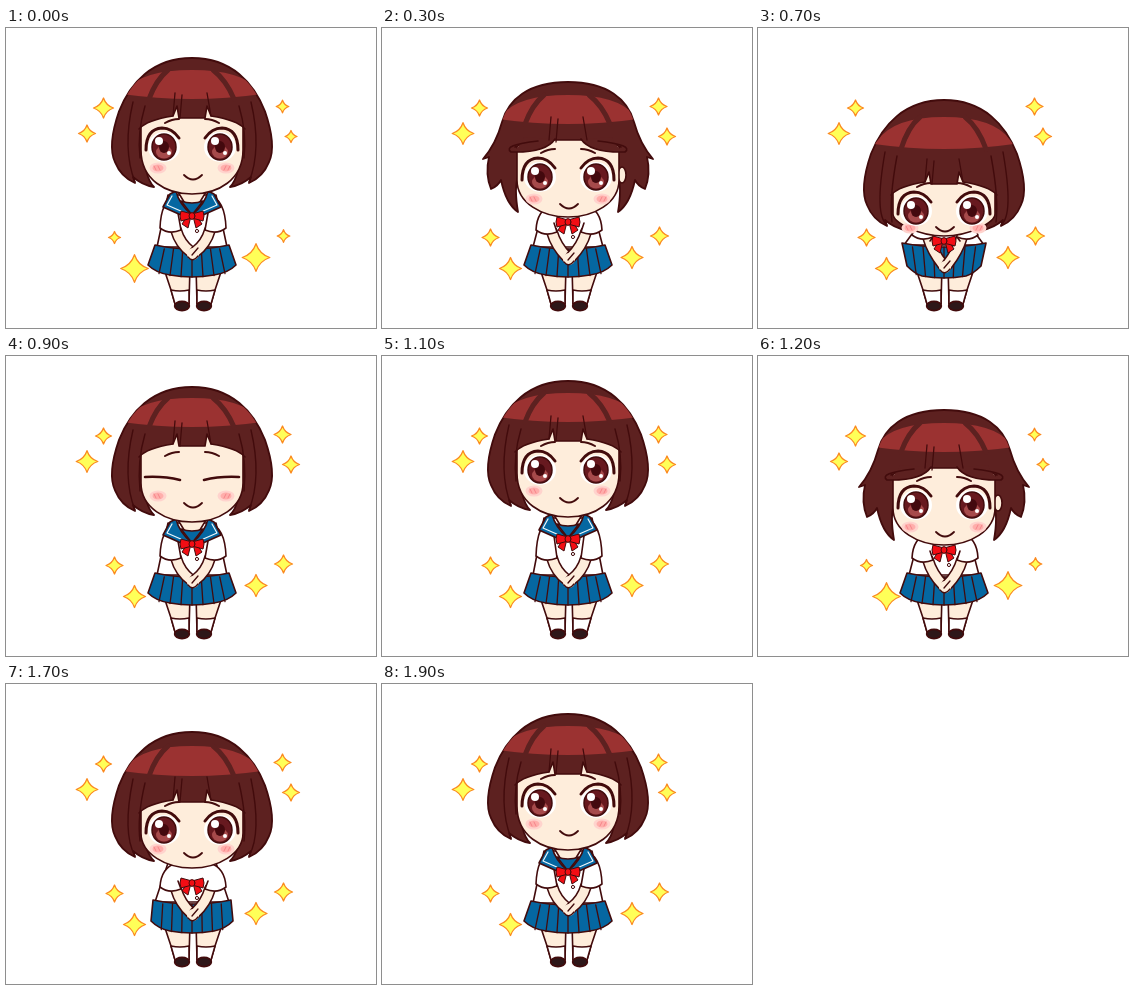
Write an HTML page with a canvas that moves like this. It is 370x300 px and loops after 2 s.

```html
<!DOCTYPE html>
<html lang="en">
<head>
<meta charset="utf-8">
<title>Bowing girl</title>
<style>
  html, body { margin: 0; width: 100%; height: 100%; overflow: hidden; background: #fff; }
  canvas { display: block; }
</style>
</head>
<body>
<canvas id="stage" width="370" height="300"></canvas>
<script>
const ctx = document.getElementById('stage').getContext('2d');
const INK = '#420b0c', HAIR = '#5d2120', SHINE = '#9b3231', SKIN = '#feeddb',
      BLUE = '#0567a1', RED = '#f20d14', CX = 186;

// Stage heights of each part, plus the half-widths of the skirt.
const up = { top: 30, bandTop: 42, bandEnd: 68, bang: 85, eye: 118, cheek: 140, mouth: 147,
  chin: 166, hairEnd: 157, shoulder: 167, ribbon: 188, hem: 204, hands: 224,
  waist: 217, waistW: 37, skirtW: 44, skirtEnd: 237 };
const low = { top: 72, bandTop: 89, bandEnd: 118, bang: 151, eye: 182, cheek: 200, mouth: 199,
  chin: 208, hairEnd: 200, shoulder: 195, ribbon: 213, hem: 211, hands: 237,
  waist: 215, waistW: 42, skirtW: 37, skirtEnd: 238 };
const deep = { ...low, top: 80, bandTop: 107, bandEnd: 138, bang: 183, eye: 196, cheek: 205, mouth: 211,
  chin: 216, hairEnd: 206, shoulder: 203, ribbon: 224, hem: 213, hands: 243,
  waist: 219, waistW: 43, skirtW: 35, skirtEnd: 236, shut: true };
const swing = { ...up, top: 54, bandTop: 67, bandEnd: 93, bang: 109, eye: 148, cheek: 171, mouth: 176,
  chin: 189, hairEnd: 184, shoulder: 177, ribbon: 194, hem: 206, hands: 229, fly: true };
const blink = { ...up, top: 31, eye: 123, shut: true };
const stretch = { ...up };
for (const k of ['top', 'bandTop', 'bandEnd', 'bang', 'eye', 'cheek', 'mouth', 'chin', 'hairEnd', 'shoulder', 'ribbon'])
  stretch[k] -= 5;
const rise = {};
for (const k in up) rise[k] = Math.round(up[k] + (low[k] - up[k]) * 0.42);

const bow = [up, stretch, swing, low, deep, deep, low, rise, blink];
const poses = [up, ...bow, ...bow, up];

// x, y, resting radius, radius change at the ends of the twinkle
const stars = [[97.5, 80, 8.5, 2], [81, 105.5, 11.3, -2.3], [276.5, 78.5, 9, -2.2], [285, 108.5, 9, -2.5],
  [108.5, 209.5, 9, -2.5], [128.5, 240.5, 11.5, 2.8], [250, 229.5, 11.5, 2.8], [277.5, 208, 9.5, -2.7]];

function draw(d, fill, line = INK, width = 1.6) {
  const p = d instanceof Path2D ? d : new Path2D(d);
  if (fill) { ctx.fillStyle = fill; ctx.fill(p); }
  if (line) { ctx.strokeStyle = line; ctx.lineWidth = width; ctx.stroke(p); }
}

function oval(x, y, rx, ry, fill, line = null, width) {
  const p = new Path2D();
  p.ellipse(x, y, rx, ry, 0, 0, 7);
  draw(p, fill, line, width);
}

// Runs paint for the left and right half; x counts outwards from the centre.
function bothSides(centre, paint) {
  for (const side of [-1, 1]) {
    ctx.save();
    ctx.translate(centre, 0);
    ctx.scale(side, 1);
    paint(side);
    ctx.restore();
  }
}

function drawStar([x, y, r, change], twinkle) {
  const R = r + change * twinkle - 0.5, n = R * 0.25;
  ctx.save();
  ctx.translate(x, y);
  draw(`M0 ${-R}Q${n} ${-n} ${R} 0Q${n} ${n} 0 ${R}Q${-n} ${n} ${-R} 0Q${-n} ${-n} 0 ${-R}Z`, '#ffff58', '#fb8a20', 1.3);
  ctx.restore();
}

function drawBody(p) {
  bothSides(CX + 1, () => {
    draw('M3 238L4 276H18L22 262L30 238Z', SKIN);
    draw('M4 262Q13 264 22 262L18 276H4Z', '#fff');
    oval(11, 278, 7.4, 4.6, '#2e1719', INK);
  });

  const { shoulder: s, hem, waist, waistW, skirtW, skirtEnd, hands } = p;
  const side = waistW - 2;
  draw(`M${CX - side} ${waist + 2}L${CX - 24} ${s}H${CX + 24}L${CX + side} ${waist + 2}Z`, '#fff');
  draw(`M${CX - waistW} ${waist}L${CX - skirtW} ${skirtEnd}Q${CX - skirtW + 8} ${skirtEnd + 8} ${CX - 22} ${skirtEnd + 10}
    Q${CX} ${skirtEnd + 14} ${CX + 22} ${skirtEnd + 10}Q${CX + skirtW - 8} ${skirtEnd + 8} ${CX + skirtW} ${skirtEnd}
    L${CX + waistW} ${waist}Q${CX} ${waist + 8} ${CX - waistW} ${waist}Z`, BLUE);
  for (let i = -3; i <= 3; i++) {
    const k = i / 4;
    draw(`M${CX + waistW * k} ${waist + 4}L${CX + skirtW * k} ${skirtEnd + 12 - 6 * k * k}`, null, INK, 1.3);
  }

  bothSides(CX + 1, () => {
    const arm = `M17 ${hem - 2}Q13 ${hem + 12} 2 ${hands}`;
    draw(arm, null, INK, 12);
    draw(arm, null, SKIN, 9);
    draw(`M17 ${s}Q32 ${s + 5} 33 ${hem - 4}Q24 ${hem + 3} 12 ${hem - 2}L15 ${s + 18}`, '#fff');
  });
  oval(CX + 1, hands + 2, 6, 6, SKIN);
  draw(`M${CX - 4} ${hands + 5}Q${CX + 1} ${hands + 11} ${CX + 6} ${hands + 4}M${CX} ${hands + 3}l6 -7`, null, INK, 1.3);

  if (s < 170) {
    draw(`M${CX - 14} ${s - 3}L${CX} ${s + 20}L${CX + 14} ${s - 3}Z`, SKIN);
    draw(`M${CX - 11} ${s + 6}Q${CX} ${s + 10} ${CX + 11} ${s + 6}L${CX} ${s + 20}Z`, BLUE);
    bothSides(CX, () => {
      draw(`M16 ${s - 4}L22 ${s - 1}L29 ${s + 12}L11 ${s + 20}L0 ${s + 20}Q13 ${s + 9} 16 ${s - 4}Z`, BLUE);
      draw(`M20 ${s + 1}L25 ${s + 10}L9 ${s + 17}`, null, '#eef7fb', 1.2);
    });
  }
  if (p.ribbon < 200) oval(CX + 5, p.ribbon + 15, 1.6, 1.6, '#fff', INK, 1);
  bothSides(CX, () => {
    const r = p.ribbon;
    draw(`M1 ${r}L4 ${r + 12}L10 ${r + 8}L4 ${r - 1}Z`, RED, INK, 1);
    draw(`M0 ${r - 2}L11 ${r - 5}Q13 ${r} 11 ${r + 5}L0 ${r + 2}Z`, RED, INK, 1);
  });
  oval(CX, p.ribbon, 3, 3.4, RED, INK, 1);
}

function hairShape(p) {
  const { top: t, hairEnd: b, eye } = p, h = b - t;
  const half = new Path2D(p.fly
    ? `M0 ${t}C40 ${t} 60 ${t + 18} 66 ${t + 40}Q72 ${t + 62} 85 ${t + 77}L79 ${t + 75}Q83 ${t + 92} 77 ${t + 107}
       Q70 ${t + 104} 67 ${t + 98}Q62 ${t + 122} 50 ${b}Q54 ${b - 24} 50 ${eye}L0 ${eye}`
    : `M0 ${t}C40 ${t} 62 ${t + h * 0.2} 73 ${t + h * 0.42}C80 ${t + h * 0.58} 83 ${t + h * 0.72} 77 ${t + h * 0.82}
       Q71 ${b - 8} 57 ${b - 2}L59 ${b - 8}Q50 ${b} 38 ${b + 2}Q48 ${b - 8} 48 ${eye}L0 ${eye}`);
  const whole = new Path2D(half);
  whole.addPath(half, new DOMMatrix([-1, 0, 0, 1, 0, 0]));
  return whole;
}

function drawEye(p, side) {
  const y = p.eye;
  if (p.shut) {
    draw(`M12 ${y + 1}Q28 ${y - 3} 47 ${y - 2}`, null, INK, 2.6);
    return;
  }
  ctx.save();
  ctx.translate(28, y);
  oval(0, 1, 16, 15, '#fff');
  oval(0, 1, 12, 13, '#67191f', INK, 1.5);
  oval(0, 6, 8, 6.5, '#a64a4b');
  oval(0, 1, 5, 6, '#43090e');
  oval(-5 * side, -5, 4, 4, '#fff');
  oval(5 * side, 7, 2, 2, '#fff');
  draw('M-15 -8Q-8 -18 2 -18Q18 -17 18 4', null, INK, 3);
  ctx.restore();
}

function drawHead(p) {
  const { bang: b, eye, chin } = p;
  const hair = hairShape(p);
  ctx.save();
  ctx.translate(CX, 0);
  draw(hair, HAIR, INK, 1.8);
  ctx.restore();

  if (p.fly) oval(CX + 54, eye - 1, 4, 8, SKIN, INK);
  draw(`M135 ${b - 12}V${eye + 4}C135 ${chin - 14} 160 ${chin} 186 ${chin}S237 ${chin - 14} 237 ${eye + 4}V${b - 12}Z`, SKIN);

  bothSides(CX, side => {
    oval(34, p.cheek, 8.5, 5.5, '#ffd3cd');
    oval(34, p.cheek, 5.5, 3.5, '#ffaeab');
    draw(`M32 ${p.cheek + 2}l2 -4M36 ${p.cheek + 2}l2 -4`, null, '#f58087', 0.9);
    drawEye(p, side);
    draw(`M13 ${eye - 27}Q20 ${eye - 27} 27 ${eye - 23}`, null, INK, 2);
  });
  draw(`M178 ${p.mouth}Q187 ${p.mouth + 9} 196 ${p.mouth}`, null, INK, 1.8);

  // Fringe
  const edge = p.fly
    ? `M133 ${b + 10}Q150 ${b + 3} 168 ${b + 3}H204Q222 ${b + 3} 239 ${b + 10}`
    : `M133 ${b + 16}Q141 ${b + 7} 167 ${b + 3}L171 ${b - 7}L173 ${b + 5}H199L201 ${b - 7}L205 ${b + 3}
       Q231 ${b + 7} 239 ${b + 16}`;
  draw(`${edge}V${b - 14}H133Z`, HAIR, null);
  draw(edge, null);
  if (p.fly) bothSides(CX, () => {
    draw(`M13 ${b + 2}Q22 ${b + 16} 57 ${b + 15}Q48 ${b + 11} 44 ${b}Z`, HAIR, null);
    draw(`M13 ${b + 2}Q22 ${b + 16} 57 ${b + 15}Q66 ${b + 8} 30 ${b + 4}`, null);
  });

  // Shine and strands stay inside the hair
  ctx.save();
  ctx.translate(CX, 0);
  ctx.clip(hair);
  const { bandTop: u, bandEnd: v } = p;
  draw(`M-66 ${v - 6}Q-50 ${u} 0 ${u}T66 ${v - 6}L70 ${v - 2}Q0 ${v + 8} -70 ${v - 2}Z`, SHINE, null);
  draw(`M-24 ${u}Q-36 ${u + 10} -43 ${v + 3}M21 ${u}Q34 ${u + 10} 42 ${v + 3}`, null, HAIR, 5);
  draw(`M-17 ${b - 20}L-19 ${b + 3}M-10 ${b - 18}L-12 ${b + 5}M15 ${b - 20}L19 ${b + 3}`, null, INK, 1.3);
  ctx.restore();
  if (!p.fly) bothSides(CX, () => {
    draw(`M59 ${v + 6}Q70 ${b + 36} 57 ${p.hairEnd - 3}M47 ${v + 10}Q55 ${b + 20} 52 ${eye + 12}`, null, INK, 1.4);
  });
}

function render(now) {
  const step = Math.floor(now % 2000 / 100);
  ctx.fillStyle = '#fff';
  ctx.fillRect(0, 0, 370, 300);
  ctx.lineJoin = ctx.lineCap = 'round';
  const twinkle = [1, 0, -1, 0][step % 4];
  for (const star of stars) drawStar(star, twinkle);
  drawBody(poses[step]);
  drawHead(poses[step]);
}

const start = performance.now();
function tick() {
  render(performance.now() - start);
  requestAnimationFrame(tick);
}
tick();
</script>
</body>
</html>
```
